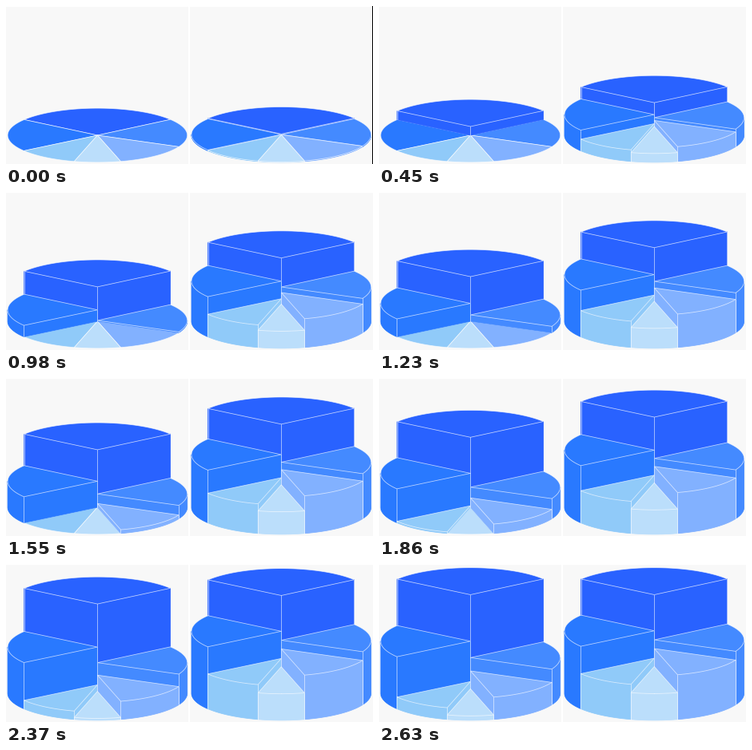
A matplotlib script for the animation above (2950 ms loop, 459 px wide and 198 px high).

```python
import numpy as np
import matplotlib.pyplot as plt
from matplotlib.animation import FuncAnimation
from matplotlib.patches import Polygon, Rectangle

W, H, DPI = 459, 198, 100
LOOP, TICK, END = 2950, 10, 2630      # milliseconds
RX, RY, CY = 112.3, 33.9, 162
LINE = 0.8 * 72 / DPI
WHITE = (1, 1, 1, 0.68)

# start angle, end angle (clockwise from the right), height, colour; back to front
SLICES = [
    (215.3, 324.3, 123.5, "#2962ff"),
    (145.0, 215.3, 78.3, "#2979ff"),
    (-35.7, 25.1, 67.0, "#448aff"),
    (105.0, 145.0, 44.0, "#90caf9"),
    (25.1, 75.0, 56.0, "#82b1ff"),
    (75.0, 105.0, 33.5, "#bbdefb"),
]
RANKS = [0, 1, 2, 4, 3, 5]            # rising order, tallest first

TIMES = [0, 250, 450, 770, 1230, 1860, 2120, END]
STAGGER = [0, 0.027, 0.089, 0.262, 0.453, 0.71, 0.816, 1]
TOGETHER = [0.0065, 0.106, 0.182, 0.322, 0.497, 0.708, 0.825, 1]

fig = plt.figure(figsize=(W / DPI, H / DPI), dpi=DPI, facecolor="white")
ax = fig.add_axes([0, 0, 1, 1])
ax.set_xlim(0, W)
ax.set_ylim(H, 0)
ax.axis("off")


def rim(cx, a, b):
    t = np.radians(np.linspace(a, b, 40))
    return np.column_stack([cx + RX * np.cos(t), CY + RY * np.sin(t)])


def patch(color, edge, z):
    p = Polygon(np.zeros((3, 2)), closed=True, facecolor=color, zorder=z,
                edgecolor=edge, linewidth=LINE, joinstyle="round")
    return ax.add_patch(p)


class Slice:
    def __init__(self, cx, a, b, height, color, z):
        self.height = height
        self.outline = np.vstack([[cx, CY], rim(cx, a, b)])
        patch(color, WHITE, 1).set_xy(self.outline)

        # outer wall faces the viewer only on the front half
        lo, hi = max(a, 0), min(b, 180)
        self.walls = [rim(cx, lo, hi)] if lo < hi else []
        self.feet = [self.outline[0]]
        # cut faces and corner edges, kept when they can be seen
        for angle, corner, turn in ((a, 1, -1), (b, -1, 1)):
            rad = np.radians(angle)
            cut = turn * np.cos(rad) > 0
            if cut:
                self.walls.append(self.outline[[0, corner]])
            if cut or np.sin(rad) > 0:
                self.feet.append(self.outline[corner])

        self.faces = [patch(color, color, z) for _ in self.walls]
        self.posts = [ax.plot([], [], color=WHITE, lw=LINE, zorder=z + 0.2)[0]
                      for _ in self.feet]
        self.top = patch(color, WHITE, z + 0.3)

    def raise_to(self, part):
        lift = self.height * max(part, 0)
        shown = lift > 0
        for art in self.faces + self.posts + [self.top]:
            art.set_visible(shown)
        if not shown:
            return
        for face, base in zip(self.faces, self.walls):
            face.set_xy(np.vstack([base, base[::-1] - [0, lift]]))
        for post, (x, y) in zip(self.posts, self.feet):
            post.set_data([x, x], [y - lift, y])
        self.top.set_xy(self.outline - [0, lift])


def pie(cx):
    return [Slice(cx, *spec, z=2 + i) for i, spec in enumerate(SLICES)]


for x, width in ((0, 228), (230, 229)):
    ax.add_patch(Rectangle((x, 1), width, H - 1, facecolor="#f8f8f8",
                           linewidth=0, zorder=0))
border = ax.add_patch(Rectangle((W - 1, 0), 1, H, facecolor="black",
                                linewidth=0, zorder=20))
left, right = pie(114.4), pie(344.3)


def draw(i):
    t = min(i * TICK, END)
    clock = np.interp(t, TIMES, STAGGER)
    ease = 1 - (1 - np.interp(t, TIMES, TOGETHER)) ** 2
    for one, other, rank in zip(left, right, RANKS):
        one.raise_to(clock - rank / 6)
        other.raise_to(ease)
    # the dark right edge blinks briefly
    border.set_visible(t // 23 % 11 == 0)
    return []


anim = FuncAnimation(fig, draw, frames=LOOP // TICK, interval=TICK,
                     init_func=lambda: draw(0), repeat=True, repeat_delay=0)
plt.show()
```
